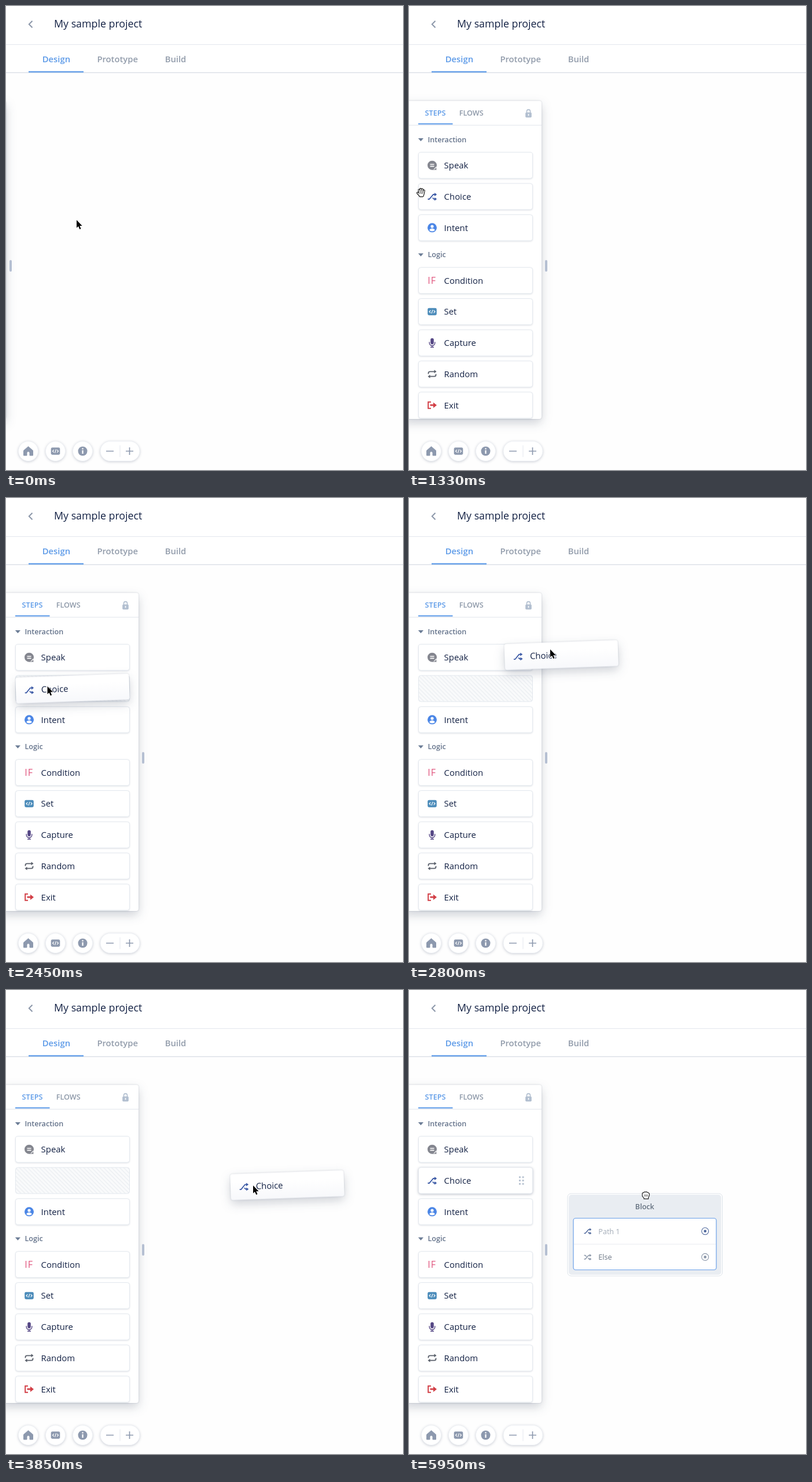
An HTML page that plays this animation: 686x800 px, repeating every 6.02 s.

```html
<!DOCTYPE html>
<html lang="en">
<head>
<meta charset="utf-8">
<title>Drag a step</title>
<style>
  html, body { margin: 0; width: 100%; height: 100%; overflow: hidden; background: #fff; }
  svg { display: block; width: 686px; height: 800px; font-family: "Open Sans", sans-serif; }
  .bold { font-weight: 600; }
  .small { font-size: 12.6px; }
  .tab { font-size: 14.8px; fill: #929cab; }
  .blue { fill: #5c9ae8; }
  .head { fill: #63728a; }
  .label { font-size: 14.9px; fill: #132144; }
  .line { fill: none; stroke: currentColor; }
  .box { fill: #fff; stroke: #e3e8ee; filter: drop-shadow(0 1px 1px rgba(19,33,68,.12)); }
  .hover .box { filter: drop-shadow(0 1px 2px rgba(19,33,68,.28)); }
  .round { fill: #fff; stroke: #eef1f5; filter: drop-shadow(0 1px 2px rgba(19,33,68,.22)); }
  .panel { fill: #fff; filter: drop-shadow(0 7px 9px rgba(19,33,68,.17)) drop-shadow(0 0 1px rgba(19,33,68,.22)); }
  .lifted { fill: url(#fade); filter: drop-shadow(0 7px 9px rgba(19,33,68,.17)) drop-shadow(0 0 1px rgba(19,33,68,.2)); }
</style>
</head>
<body>
<svg viewBox="0 0 686 800">
  <defs>
    <pattern id="hatch" width="4.9" height="4.9" patternUnits="userSpaceOnUse" patternTransform="rotate(-45)">
      <rect width="4.9" height="4.9" fill="#f9fafb"/>
      <rect width="1.2" height="4.9" fill="#eaedf1"/>
    </pattern>
    <linearGradient id="fade" x2="0" y2="1">
      <stop offset=".3" stop-color="#fff"/>
      <stop offset="1" stop-color="#f7f8fb"/>
    </linearGradient>

    <g id="speak">
      <path d="M0-8A8 8 0 1 1 0 8A8 8 0 1 1 0-8M2 7.5L7.5 8L7 2z" fill="currentColor"/>
      <path d="M-3.5-1.7h7M-3.5 1.7h7" stroke="#fff" stroke-width="1.6"/>
    </g>
    <g id="choice">
      <path d="M-7.5 4.5h2.5L2-3.5h3M.8 2L3 4.3h2" class="line" stroke-width="1.8"/>
      <path d="M4-6.4l4.2 2.9-4.2 2.9zM4 1.4l4.2 2.9L4 7.2z" fill="currentColor"/>
    </g>
    <g id="shuffle">
      <use href="#choice"/>
      <path d="M-7.5-3.5h2.5l2.6 2.6" class="line" stroke-width="1.8"/>
    </g>
    <g id="intent">
      <circle r="8" fill="currentColor"/>
      <circle cy="-2.3" r="2.6" fill="#fff"/>
      <path d="M-4.9 4.2Q-3.5 1.3 0 1.3T4.9 4.2Q3 6.3 0 6.3T-4.9 4.2z" fill="#fff"/>
    </g>
    <g id="condition">
      <text x="-7.8" y="5.8" font-size="16" letter-spacing="1" fill="currentColor">IF</text>
    </g>
    <g id="code">
      <rect x="-7.8" y="-6.2" width="15.6" height="12.4" rx="2.4" fill="currentColor"/>
      <path d="M-2.6-2.4L-5 0l2.4 2.4M2.6-2.4L5 0 2.6 2.4M.9-3.2L-.9 3.2" fill="none" stroke="#fff" stroke-width="1.2"/>
    </g>
    <g id="capture">
      <rect x="-2.8" y="-8" width="5.6" height="10.5" rx="2.8" fill="currentColor"/>
      <path d="M-4.8-1.5V0a4.8 4.8 0 0 0 9.6 0v-1.5M0 5v2.4M-3 7.4h6" class="line" stroke-width="1.4"/>
    </g>
    <g id="random">
      <path d="M-6.5 0v-1.5a2.7 2.7 0 0 1 2.7-2.7H4M6.5 0v1.5a2.7 2.7 0 0 1-2.7 2.7H-4" class="line" stroke-width="1.8"/>
      <path d="M3.5-7.2l4 3-4 3zM-3.5 7.2l-4-3 4-3z" fill="currentColor"/>
    </g>
    <g id="exit">
      <path d="M-2-5.5h-4.8v11H-2" class="line" stroke-width="2"/>
      <path d="M-3.5-1.4H2v-3.4L8 0 2 4.8V1.4h-5.5z" fill="currentColor"/>
    </g>

    <path id="arrow" d="M0 0V13.6L3 10.8 5.3 16l2.2-1L5.3 9.9H9.6z" stroke="#fff" stroke-width="1.6" paint-order="stroke"/>
    <g id="open" stroke-linecap="round" stroke-linejoin="round">
      <path id="hand" d="M-3.6-4.6L-2.4 1M-.9-6.2L-.4 0M1.9-5.8L1.7 0M4.8-3.6L3.7 2M-6 .3L-2.5 4.2M-2.4 2L-2 5.5H2.6L3.7 2z"
        stroke="#111" stroke-width="4"/>
      <path d="M-3.6-4.6L-2.4 1M-.9-6.2L-.4 0M1.9-5.8L1.7 0M4.8-3.6L3.7 2M-6 .3L-2.5 4.2M-2.4 2L-2 5.5H2.6L3.7 2z"
        fill="#fff" stroke="#fff" stroke-width="1.7"/>
    </g>
    <g id="closed">
      <path d="M-5.8-.8Q-6.6-4.6-3.6-4.6Q-2.3-6.6-.7-5.4Q1-6.8 2.4-5.1Q4.6-5.6 5-3.8Q6.8-3.6 6.3-.6Q6 2.2 4.6 3.6V6.2H-3V4.6L-5.8 1.6z"
        fill="#fff" stroke="#222" stroke-width="1.2" stroke-linejoin="round"/>
      <path d="M-2-1.5V2.2M.5-1.5V2.2M3-1.5V2.2" stroke="#333" stroke-width=".9"/>
    </g>
  </defs>

  <rect y="116" width="686" height="684" fill="#fefefe"/>
  <g id="block"></g>
  <g id="panel"></g>

  <rect y="66" width="686" height="1" fill="#e3e7ed"/>
  <rect y="114" width="686" height="1.6" fill="#dfe3e9"/>
  <rect x="39" y="112.4" width="95" height="2.2" fill="#5c9ae8"/>
  <path d="M45.5 25.8L39.8 31.5l5.7 5.7" fill="none" stroke="#8d98aa" stroke-width="2"/>
  <text x="83" y="37" font-size="17.8" fill="#132144">My sample project</text>
  <text x="62.7" y="97" class="tab bold blue">Design</text>
  <text x="157.4" y="97" class="tab bold">Prototype</text>
  <text x="274.7" y="97" class="tab bold">Build</text>

  <g color="#8d99ae">
    <circle class="round" cx="38.5" cy="767.5" r="17"/>
    <circle class="round" cx="85.5" cy="767.5" r="17"/>
    <circle class="round" cx="132.5" cy="767.5" r="17"/>
    <rect class="round" x="163" y="750.5" width="68" height="34" rx="17"/>
    <path d="M38.5 759.5l8 7v8.5h-5.5v-4.5a2.5 2.5 0 0 0-5 0v4.5h-5.5v-8.5z" fill="currentColor" stroke="currentColor" stroke-linejoin="round"/>
    <use href="#code" x="85.5" y="767.5"/>
    <circle cx="132.5" cy="767.5" r="8" fill="currentColor"/>
    <path d="M132.5 766v6M132.5 762.3v2.2" stroke="#fff" stroke-width="2.2"/>
    <path d="M173 767.5h13M207 767.5h13M213.5 761v13" stroke="currentColor" stroke-width="1.7"/>
    <path d="M197 757.5v20" stroke="#e3e7ee"/>
  </g>

  <g id="drag">
    <rect class="lifted" x="-98" y="-22.5" width="196" height="45" rx="4"/>
    <use href="#choice" x="-75" color="#3c5aa6"/>
    <text x="-54.3" y="5.2" class="label">Choice</text>
  </g>
  <use id="cursor"/>
</svg>
<script>
const LOOP = 6020, STEP = 70, LAG = 80;
const OPEN = 1050, HAND = 1260, HOVER = 1960, GRAB = 2380, DROP = 4340;
const el = id => document.getElementById(id);

// Step list: icon, label, colour, vertical centre
const steps = [
  ['speak', 'Speak', '#84868f', 274.7],
  ['choice', 'Choice', '#3c5aa6', 328.5],
  ['intent', 'Intent', '#4b86e6', 382.3],
  ['condition', 'Condition', '#e0567f', 473.3],
  ['code', 'Set', '#4c8cba', 527],
  ['capture', 'Capture', '#554785', 580.8],
  ['random', 'Random', '#5a606b', 634.5],
  ['exit', 'Exit', '#d23f46', 688.2],
];

const box = (y, attrs) => `<rect x="16.5" y="${y - 22.5}" width="197" height="45" rx="4" ${attrs}/>`;

const card = ([icon, label, color, y]) => `<g id="card-${icon}">${box(y, 'class="box"')}
  <use href="#${icon}" x="40" y="${y}" color="${color}"/>
  <text x="60.6" y="${y + 5.4}" class="label">${label}</text></g>`;

const section = (label, y) => `<path d="M15.8 ${y - 2.3}h9.2l-4.6 5.2z" fill="#6c7d96"/>
  <text x="32.4" y="${y + 4.6}" class="small bold head">${label}</text>`;

const grip = [322.8, 328.5, 334.2].map(y => `<path d="M190 ${y}h3M195.6 ${y}h3"/>`).join('');

el('panel').innerHTML = `
  <rect class="panel" x="-10" y="163.5" width="239" height="548.5" rx="4"/>
  <rect x="235" y="438" width="4" height="20" rx="2" fill="#b5bfd2"/>
  <rect y="205" width="229" height="1" fill="#e3e7ed"/>
  <rect x="16" y="202.3" width="59.5" height="2" fill="#5c9ae8"/>
  <text x="27.6" y="189" class="small bold blue">STEPS</text>
  <text x="86.8" y="189" class="small bold" fill="#8d98a8">FLOWS</text>
  <rect x="201.2" y="183.4" width="10.6" height="8.8" rx="1.6" fill="#b2bfd0"/>
  <path d="M203.5 184v-2.4a3 3 0 0 1 6 0v2.4" fill="none" stroke="#b2bfd0" stroke-width="1.6"/>
  <path d="M206.5 186v3.4" stroke="#fff" stroke-width="1.6"/>
  ${section('Interaction', 230.4)}${section('Logic', 428.8)}
  ${steps.map(card).join('')}
  <g id="grip" stroke="#bac5d3" stroke-width="3">${grip}</g>
  <g id="gap">${box(328.5, 'fill="url(#hatch)" stroke="#e3e8ee"')}</g>`;

const path = (icon, label, y, color, ink) => `
  <use href="#${icon}" transform="translate(308.7 ${y}) scale(.82)" color="${color}"/>
  <text x="327.3" y="${y + 4.7}" class="small" fill="${ink}">${label}</text>
  <circle cx="511.7" cy="${y}" r="6" fill="none" stroke="${color}" stroke-width="1.1"/>
  <circle cx="511.7" cy="${y}" r="2.3" fill="${color}"/>`;

el('block').innerHTML = `
  <rect x="274" y="351" width="267.5" height="142" rx="6" fill="#fff" stroke="#dde3ea"/>
  <rect x="276" y="353" width="263.5" height="138" rx="5" fill="#e9edf2"/>
  <text x="407.3" y="378" class="small bold" text-anchor="middle" fill="#63707f">Block</text>
  <rect x="284" y="393.5" width="247" height="89" rx="4" fill="#fff" stroke="#6ba0e8" stroke-width="1.2"/>
  <path d="M285 438.2h245" stroke="#e8ebf0"/>
  ${path('choice', 'Path 1', 415.8, '#4f689c', '#a2abb7')}
  ${path('shuffle', 'Else', 460.4, '#8a96a8', '#6b7684')}`;

// Pointer stops: time, x, y
const stops = [
  [0, 122, 369], [420, 122, 369], [910, 20, 330], [1190, 20, 330], [1330, 21, 322],
  [1890, 21, 322], [GRAB, 56, 329], [2800, 244, 261], [3150, 400, 245],
  [3640, 427, 337], [3850, 427, 337], [4200, 409, 354], [LOOP, 409, 354],
];

// Smooth curve through the stops without overshoot
function at(t, k) {
  const slope = i => stops[i + 1] && stops[i]
    ? (stops[i + 1][k] - stops[i][k]) / (stops[i + 1][0] - stops[i][0]) : 0;
  const tangent = i => {
    const a = slope(i - 1), b = slope(i);
    return a * b > 0 ? 2 * a * b / (a + b) : 0;
  };
  const i = stops.findIndex((s, n) => t < stops[n + 1][0]);
  const [p, q] = [stops[i], stops[i + 1]], span = q[0] - p[0], u = (t - p[0]) / span, v = 1 - u;
  return p[k] * v * v * (1 + 2 * u) + q[k] * u * u * (3 - 2 * u)
    + span * u * v * (tangent(i) * v - tangent(i + 1) * u);
}

const show = (id, on) => el(id).setAttribute('visibility', on ? 'visible' : 'hidden');

function draw(t) {
  const dragging = t >= GRAB && t < DROP;
  const hover = t >= HOVER && t < GRAB || t >= DROP;
  const open = Math.min(1, Math.max(0, (t - OPEN) / 250));
  el('panel').setAttribute('transform', `translate(${-229 * (1 - open) ** 3} 0)`);
  show('card-choice', !dragging);
  show('gap', dragging);
  show('grip', hover);
  el('card-choice').classList.toggle('hover', hover);
  show('block', t >= DROP);

  // The lifted card trails the pointer
  const late = Math.max(GRAB, t - LAG);
  show('drag', dragging);
  el('drag').setAttribute('transform',
    `translate(${115 + at(late, 1) - 56} ${328.5 + at(late, 2) - 329}) rotate(-2)`);

  const shape = t >= DROP ? 'closed' : t >= HAND && t < GRAB ? 'open' : 'arrow';
  el('cursor').setAttribute('href', '#' + shape);
  el('cursor').setAttribute('transform', `translate(${at(t, 1)} ${at(t, 2)})`);
}

const start = performance.now();
function tick() {
  const t = (performance.now() - start) % LOOP;
  draw(Math.floor(t / STEP) * STEP);
  requestAnimationFrame(tick);
}
tick();
</script>
</body>
</html>
```
